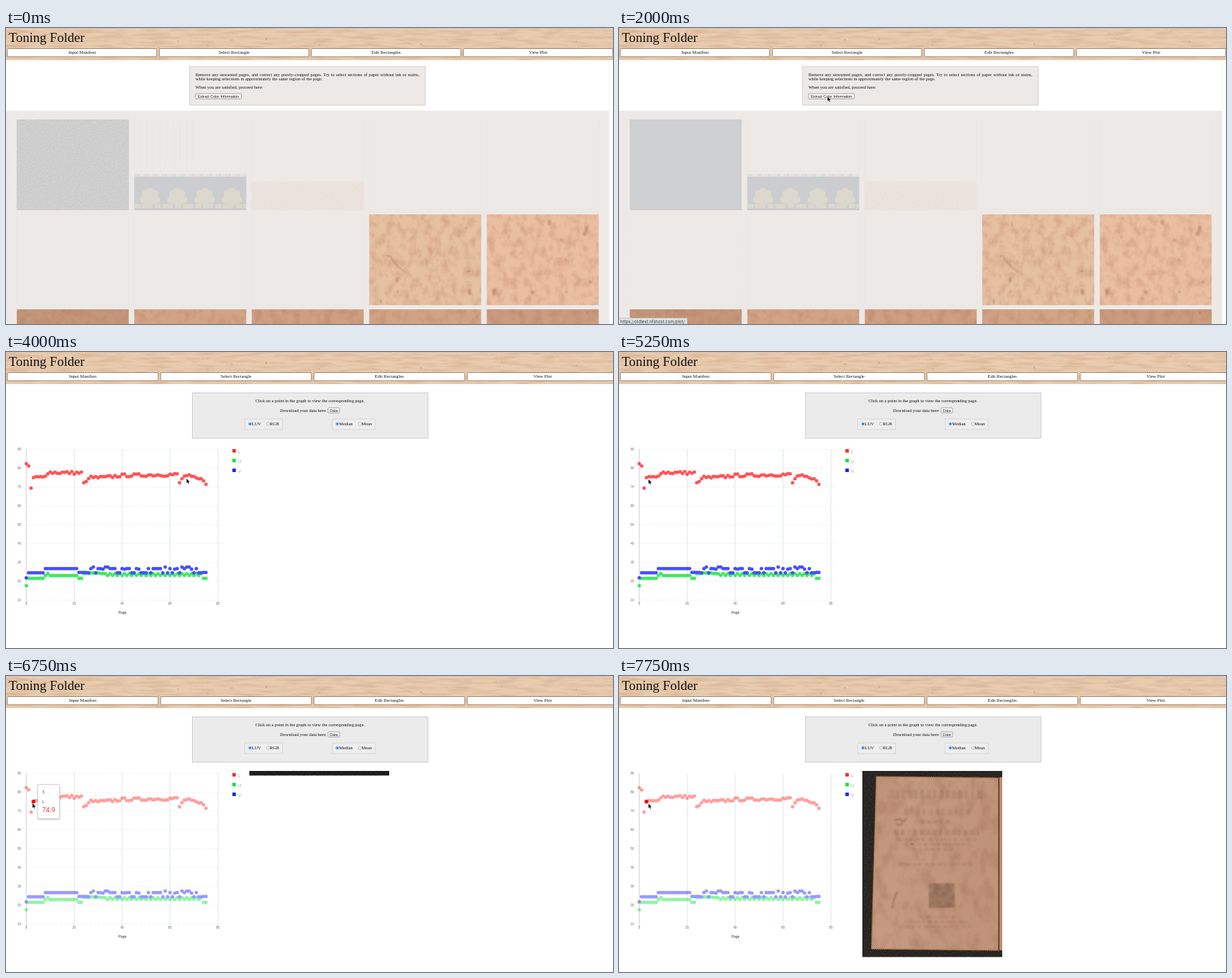
These frames come from a looping animation (868 by 424 pixels, 8 s). An HTML page:

```html
<!DOCTYPE html>
<html lang="en">
<head>
<meta charset="utf-8">
<title>Toning Folder</title>
<style>
html, body { margin: 0; width: 868px; height: 424px; overflow: hidden; background: #fff; }
svg { display: block; }
text, p { font-family: "Liberation Serif", Times, serif; font-size: 6.4px; fill: #111; }
p { margin: 0; line-height: 6px; color: #111; white-space: nowrap; }
.wide { text-align-last: justify; }
.mid { text-anchor: middle; }
.sans { font-family: "Liberation Sans", Arial, sans-serif; font-size: 5.35px; }
.tick { font-family: "Liberation Sans", Arial, sans-serif; font-size: 4.6px; fill: #666; }
.tip { font-family: "Open Sans", sans-serif; }
</style>
</head>
<body>
<svg id="stage" width="868" height="424" viewBox="0 0 868 424"></svg>
<script>
let seed = 7;
const rand = (a = 0, b = 1) => {
  seed = seed * 16807 % 2147483647;
  return a + (b - a) * seed / 2147483647;
};
const pick = list => list[Math.floor(rand(0, list.length))];
const range = n => [...Array(n).keys()];
const many = (n, f) => range(n).map(f).join('');

// Value at t of key points [t, value, ...], eased between neighbours.
const ease = u => u * u * (3 - 2 * u);
function along(keys, t) {
  const i = keys.findIndex(k => k[0] > t);
  if (i < 0) return keys[keys.length - 1].slice(1);
  if (!i) return keys[0].slice(1);
  const [a, b] = [keys[i - 1], keys[i]];
  const u = ease((t - a[0]) / (b[0] - a[0]));
  return a.slice(1).map((v, j) => v + (b[j + 1] - v) * u);
}

const rect = (x, y, w, h, fill, more = '') =>
  `<rect x="${x}" y="${y}" width="${w}" height="${h}" fill="${fill}" ${more}/>`;
const line = (x1, y1, x2, y2, color, more = '') =>
  `<path d="M${x1} ${y1}L${x2} ${y2}" stroke="${color}" fill="none" ${more}/>`;
const text = (x, y, s, cls = '', more = '') =>
  `<text x="${x}" y="${y}" class="${cls}" ${more}>${s}</text>`;
const dot = (x, y, r, fill, more = '') =>
  `<circle cx="${x}" cy="${y}" r="${r}" fill="${fill}" ${more}/>`;

// Lays coloured noise over whatever it is applied to.
const grain = (id, freq, octaves, [r, g, b], gain, bias) => `
  <filter id="${id}" x="0" y="0" width="1" height="1" color-interpolation-filters="sRGB">
    <feTurbulence type="fractalNoise" baseFrequency="${freq}" numOctaves="${octaves}" seed="3"/>
    <feColorMatrix result="n" values="0 0 0 0 ${r} 0 0 0 0 ${g} 0 0 0 0 ${b} ${gain} 0 0 0 ${bias}"/>
    <feComposite in="n" in2="SourceGraphic" operator="in" result="m"/>
    <feMerge><feMergeNode in="SourceGraphic"/><feMergeNode in="m"/></feMerge>
  </filter>`;

const defs = `<defs>
  ${grain('wood', '.03 .25', 3, [.75, .53, .36], .7, -.27)}
  ${grain('paper', '.09 .07', 3, [.68, .43, .3], .7, -.3)}
  ${grain('leaf', '.06 .04', 3, [.5, .3, .2], .5, -.22)}
  ${grain('speck', '.7', 2, [1, 1, 1], .6, -.2)}
  ${grain('cloth', '.5', 2, [.08, .07, .06], 1.2, -.35)}
  ${grain('print', '.12', 2, [.3, .2, .15], 1.4, -.45)}
  <filter id="soft"><feGaussianBlur stdDeviation=".8"/></filter>
  <filter id="shade" x="-.2" y="-.2" width="1.4" height="1.4">
    <feDropShadow dx="0" dy=".7" stdDeviation="1" flood-opacity=".3"/></filter>
  <linearGradient id="tan" x1="0" x2="1" y1="0" y2=".3">
    <stop stop-color="#bd9075"/><stop offset=".3" stop-color="#c49a81"/>
    <stop offset="1" stop-color="#bf937a"/></linearGradient>
</defs>`;

const header = rect(0, 0, 868, 46, '#e9ccb0', 'filter="url(#wood)"')
  + many(26, () => dot(rand(0, 868), rand(3, 45), rand(.4, 1), '#9a7356', 'opacity=".6"'))
  + line(0, .7, 868, .7, '#d3c5b7', 'stroke-dasharray="9 2 4 1"')
  + text(4, 20, 'Toning Folder', '', 'style="font-size:19.1px"');

const nav = (step, w) => ['Input Manifest', 'Select Rectangle', 'Edit Rectangles', 'View Plot']
  .map((s, i) => rect(2 + i * step, 29.5, w, 11.5, '#fff', 'rx=".7" stroke="#8a735c" stroke-width=".8"')
    + text(2 + i * step + w / 2, 37.4, s, 'mid', 'style="font-size:6.6px"')).join('');

const button = (x, y, w, h, s) =>
  rect(x, y, w, h, '#f8f8f8', 'rx="1" stroke="#777" stroke-width=".6"')
  + text(x + w / 2, y + h / 2 + 1.9, s, 'sans mid');

function tiles() {
  const X = i => 15.5 + 168 * i;
  const frame = (i, y) => rect(X(i), y, 160, 130, 'none',
    'stroke="#e5e6e4" stroke-width=".7" stroke-dasharray="3 2"');
  const stain = (x, y) =>
    `<ellipse cx="${x}" cy="${y}" rx="${rand(1, 3)}" ry="${rand(1, 5)}" fill="#9d6849" opacity=".4" filter="url(#soft)"/>`;
  const paper = (i, y, color) => rect(X(i), y, 160, 130, color, 'filter="url(#paper)"')
    + many(9, () => stain(X(i) + rand(5, 155), y + rand(5, 125)));
  const flower = x => many(5, i => dot(x + 9 * Math.cos(Math.PI * i / 4), 246 - 12 * Math.sin(Math.PI * i / 4), 5.5, '#ddd8ce'))
    + dot(x, 246, 8, '#ddd8ce');
  return rect(0, 119, 862, 305, '#ece9e6')
    + line(0, 119, 862, 119, '#e2dfdc', 'stroke-width=".6"')
    + many(4, i => frame(i + 1, 131)) + many(3, i => frame(i, 267))
    + rect(15.5, 131, 160, 130, '#cdcfd0')
    + `<g id="rough">${rect(15.5, 131, 160, 130, '#c9c9c9', 'filter="url(#speck)"')}
       ${many(9, i => line(192 + i * 9.5, 134, 192 + i * 9.5, rand(190, 208), '#e6e5e2', 'stroke-width=".7"'))}</g>`
    + rect(183.5, 213, 160, 48, '#cbcdce')
    + line(183.5, 211, 343.5, 211, '#dbdbd9', 'stroke-width="4" stroke-dasharray="2 1 5 2 1 2"')
    + many(4, i => flower(206 + 39 * i))
    + line(183.5, 255, 343.5, 255, '#ddd8ce', 'stroke-width="6" stroke-dasharray="9 2 15 3"')
    + rect(351.5, 220, 160, 41, '#e9dfd9', 'filter="url(#speck)"')
    + paper(3, 267, '#e5c0a1') + paper(4, 267, '#eabea1')
    + '<path d="M549 325Q553 338 572 350" fill="none" stroke="#9d6849" stroke-width="1.8" opacity=".45" filter="url(#soft)"/>'
    + ['#c4967a', '#d2a486', '#ce9f82', '#d2a487', '#cb9c80'].map((c, i) => paper(i, 403, c)).join('');
}

const picker = header + nav(217.4, 213.5)
  + rect(262.5, 55, 337, 55.5, '#ece9e6', 'stroke="#c9c5c2" stroke-width=".7"')
  + `<foreignObject x="271" y="63.5" width="320" height="30">
    <p class="wide">Remove any unwanted pages, and correct any poorly-cropped pages. Try to select sections of paper without ink or stains,</p>
    <p>while keeping selections in approximately the same region of the page.</p>
    <p style="margin-top:6px">When you are satisfied, proceed here:</p></foreignObject>`
  + button(271, 94, 65.5, 7.5, 'Extract Color Information') + tiles()
  + line(862.5, 46, 862.5, 424, '#eee', 'stroke-width=".7"');

// Plotted values per page: a lightness trend with jitter, and two stepped colour levels.
const trend = [[0, 82.4], [1, 81.2], [2, 69.4], [3, 75], [7, 75.2], [9, 77.7], [23, 77.5], [24, 72], [25, 72.4],
  [26, 75], [31, 75], [42, 76.2], [63, 76.6], [64, 72.2], [66, 76], [74, 73.8], [75, 71.4]];
const lightness = i => along(trend, i)[0] + (i > 3 && i < 75 ? rand(-.8, .8) : 0);
const levelU = i => i < 1 ? 17.5 : i < 8 ? 21.4 : i < 22 ? pick([22.9, 22.9, 24]) : i < 24 || i > 73 ? 21.4
  : i < 33 ? pick([24, 24.3]) : i % 2 ? 23.9 : 23;
const levelV = i => i < 1 ? 21.7 : i < 8 ? 24.4 : i < 22 ? 26.6 : i < 26 || i > 73 ? 24.6
  : pick([27.5, 26.6, 26.3, 26.6, 24.4]);
const series = [['L', lightness, '#ff2a2a'], ['U', levelU, '#0ae63a'], ['V', levelV, '#1a22ff']];
const pageX = i => 29 + i * 3.425;
const valueY = v => 382 - 2.695 * v;

function chart() {
  const rows = many(9, i => line(29, 139.5 + 27 * i, 308, 139.5 + 27 * i, '#dfeeea',
    'stroke-width=".6" stroke-dasharray="4 2"'));
  const cols = many(4, i => line(97.5 + 68.5 * i, 139, 97.5 + 68.5 * i, 359, '#d3e2e0', 'stroke-width=".8"'));
  const dots = series.map(([, f, c]) => many(76, i => dot(pageX(i), valueY(f(i)), 2.5, c))).join('');
  return `<g id="rows">${rows}</g>` + cols
    + line(29, 139, 29, 359, '#c3cbcd', 'stroke-width=".9"')
    + many(9, i => text(21.5, 141.2 + 27 * i, 90 - 10 * i, 'tick', 'text-anchor="end"'))
    + many(5, i => text(29 + 68.5 * i, 361.7, 20 * i, 'tick mid'))
    + text(166.5, 374.5, 'Page', 'tick mid', 'style="font-size:5px;fill:#333"')
    + `<g id="dots">${dots}</g>`
    + series.map(([s, , c], i) => rect(323.7, 139 + 14 * i, 5, 5, c)
      + text(332, 144.6 + 14 * i, s, 'sans', 'style="font-size:6px;fill:#999"')).join('');
}

const radio = (x, on, s) => dot(x, 103, 2, '#fff', `stroke="${on ? '#1a73e8' : '#888'}" stroke-width=".6"`)
  + (on ? dot(x, 103, 1.3, '#1a73e8') : '') + text(x + 2.6, 105.3, s);
const group = (x, w) => rect(x, 96, w, 15, '#eeeeee', 'stroke="#cfcfcf" stroke-width=".7"');

// An old leaf on a dark cloth, with print faintly showing through.
function photo() {
  const row = (y, w, h) => many(Math.round(w / 9), i =>
    rect(455 - w / 2 + 9 * i, y - h / 2, rand(4, 8), h, '#77503f', `opacity="${rand(.1, .25)}"`));
  return rect(348, 136, 200, 266.5, '#302d2a', 'filter="url(#cloth)"')
    + '<path d="M368 144L543 146V393L361 391Z" fill="url(#tan)" filter="url(#leaf)"/>'
    + '<path d="M543 393L361 391L368 144L543 146" fill="none" stroke="#a8713f" stroke-width="1.6" stroke-dasharray="2 1"/>'
    + rect(544, 145, 4, 248, '#b88c6c') + line(543, 145, 543, 395, '#5b4033', 'stroke-width="1.2"')
    + '<g filter="url(#soft)">'
    + row(170, 138, 13) + row(195, 96, 9) + row(209, 48, 5) + row(224, 122, 8)
    + many(3, i => row(234 + 7 * i, 116 - 22 * i, 4)) + row(270, 108, 3)
    + rect(443, 297, 37, 35, '#8b6753', 'opacity=".55" filter="url(#print)"')
    + many(3, i => row(345 + 7 * i, 50 + 30 * i, 3))
    + '<path d="M394 207q6-4 10 0t7-4M396 211q5 5 10 0M398 309q-6 10-7 24" fill="none" stroke="#8a5530" stroke-width="2" opacity=".6"/></g>'
    + dot(419, 241, .8, '#5b3a2a');
}

const plot = header + nav(219.2, 215.5)
  + rect(266.5, 58.5, 337, 65, '#ebebeb', 'stroke="#c6c6c6" stroke-width=".8"')
  + text(434.7, 72.4, 'Click on a point in the graph to view the corresponding page.', 'mid')
  + text(392, 85.6, 'Download your data here:') + button(460.5, 80, 16.5, 7.3, 'Data')
  + group(341.5, 54) + radio(349, true, 'LUV') + radio(374.7, false, 'RGB')
  + group(466.5, 61.5) + radio(473.7, true, 'Median') + radio(506, false, 'Mean') + chart()
  + `<g id="strip">${rect(348, 136, 200, 6.5, '#242220', 'filter="url(#cloth)"')}</g><g id="photo">${photo()}</g>`
  + `<g id="hot">${dot(pageX(3), valueY(75), 2.8, '#f31010')}</g>`
  + `<g id="tip">${rect(45.3, 155.5, 31.2, 49, '#fff', 'rx="1" stroke="#bbb" stroke-width=".6" filter="url(#shade)"')}
    ${text(52, 167.5, '3', 'tip', 'style="font-size:5px"')}${text(52, 182, 'L', 'tip', 'style="font-size:5px"')}
    ${text(51.8, 194.8, '74.9', 'tip', 'style="font-size:9.3px;fill:#e22"')}</g>`;

const $ = id => document.getElementById(id);
$('stage').innerHTML = defs + `<g id="picker">${picker}</g><g id="plot">${plot}</g>
  <g id="status">${rect(-2, 415.5, 99.5, 11, '#dde1e2', 'rx="1.5" stroke="#bfc4c5" stroke-width=".7"')}
  ${text(2, 422.5, 'https://oldtext.nfshost.com/plot/', '', 'style="font:6px Inter,sans-serif;fill:#444"')}</g>
  <path id="cursor" d="M0 0V7.2L1.7 5.7L2.8 8.2L4.1 7.6L3 5.2H5.2Z" fill="#000" stroke="#fff" stroke-width=".5"/>`;

// Pointer path by quarter-second tick: [tick, x, y].
const path = [[2, 307, 115], [3, 298, 98], [11, 298, 98], [12, 302, 101], [16, 258, 181], [17, 250, 188],
  [19, 140, 149], [21, 42, 182], [23, 37.7, 182], [29, 37.7, 182], [30, 42, 182.5]];
const show = (id, opacity) => {
  $(id).style.display = opacity ? '' : 'none';
  $(id).style.opacity = +opacity;
};

let last = -1;
function draw(now) {
  requestAnimationFrame(draw);
  const tick = Math.floor(now % 8000 / 250);
  if (tick === last) return;
  last = tick;
  const hover = tick >= 23;
  show('picker', tick < 9);
  show('plot', tick >= 9);
  show('rough', tick < 7);
  show('status', tick < 7 || tick > 10 ? 0 : tick === 10 ? .5 : 1);
  show('dots', hover ? .45 : .8);
  show('rows', tick < 30 ? 1 : .25);
  show('hot', hover);
  show('tip', hover && tick < 30);
  show('strip', tick === 27);
  show('photo', tick >= 28);
  show('cursor', tick >= 2);
  $('cursor').setAttribute('transform', `translate(${along(path, tick)})`);
}
requestAnimationFrame(draw);
</script>
</body>
</html>
```
